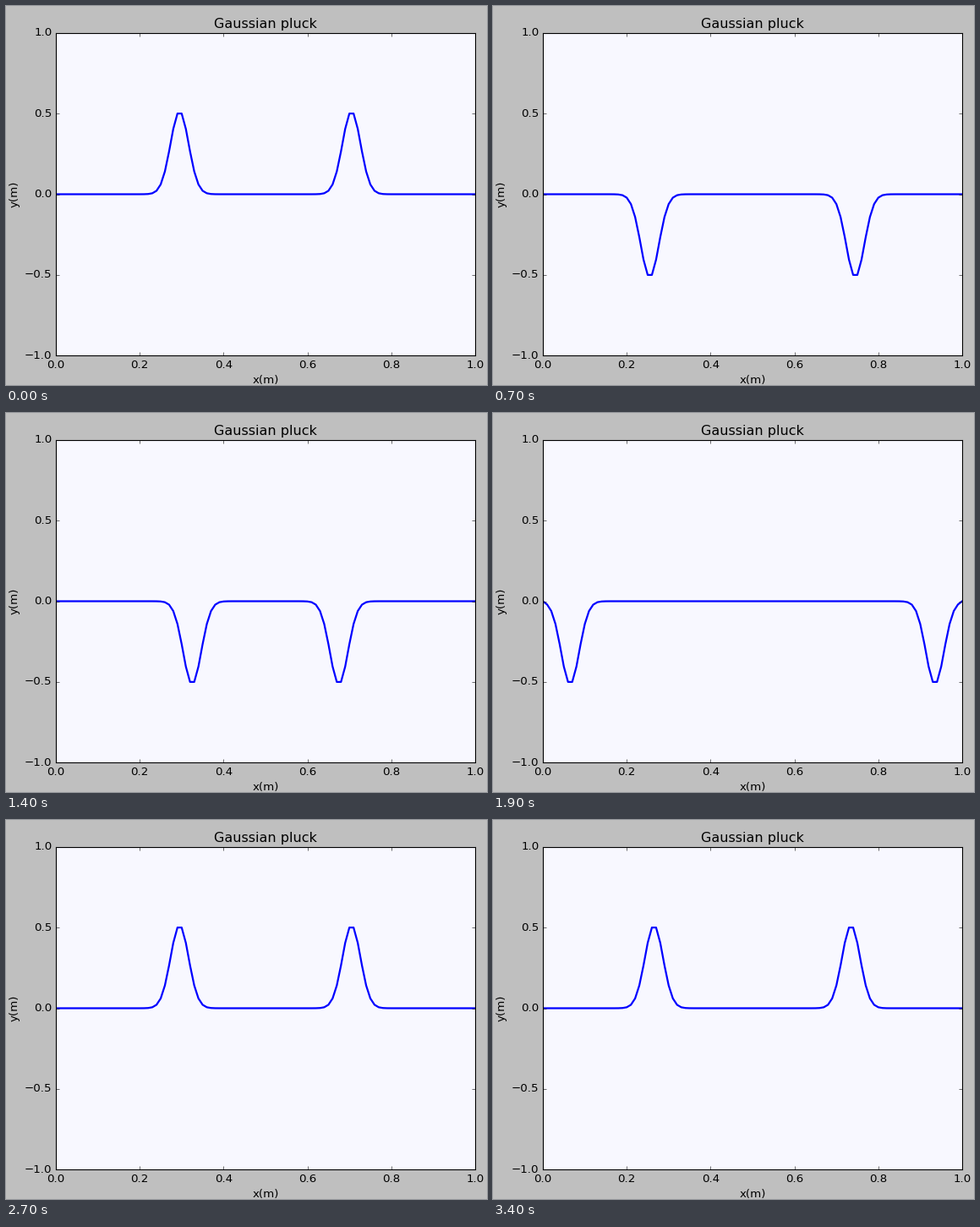
Recreate the animation shown at these times as a matplotlib script. Size 569 px wide and 448 px high, loop 3500 ms.

```python
import numpy as np
import matplotlib.pyplot as plt
from matplotlib.animation import FuncAnimation

W, H, DPI = 569, 448, 80
LEFT, RIGHT, TOP, BOTTOM = 59, 555, 31.7, 413.3

plt.rcParams.update({
    "font.family": "DejaVu Sans", "font.size": 12,
    "axes.linewidth": 1.0, "axes.axisbelow": False,
    "axes.titlesize": 14.4, "axes.titlepad": 5, "axes.labelpad": 5,
    "xtick.direction": "in", "ytick.direction": "in",
    "xtick.top": True, "ytick.right": True,
    "xtick.major.size": 4, "ytick.major.size": 4,
    "xtick.major.width": 0.5, "ytick.major.width": 0.5,
    "xtick.major.pad": 4, "ytick.major.pad": 4,
    "ytick.alignment": "center",
    "figure.facecolor": "0.75", "savefig.facecolor": "0.75",
})

# Time steps advanced per picture, as (step, repeats) runs
RUNS = [(7, 1), (8, 6), (6, 10), (4, 4), (6, 1), (4, 1), (6, 1),
        (4, 5), (6, 1), (4, 1), (8, 1), (10, 1), (8, 1)]
START = 21
steps = np.repeat(*np.transpose(RUNS))
times = START + np.concatenate([[0], np.cumsum(steps)])


def string_motion(x, count):
    """Leapfrog wave equation with fixed ends, starting at rest."""
    y = np.zeros((count, len(x)))
    y[0] = y[1] = np.exp(-1000 * (x - 0.5) ** 2)
    for n in range(1, count - 1):
        y[n + 1, 1:-1] = y[n, 2:] + y[n, :-2] - y[n - 1, 1:-1]
    return y


x = np.linspace(0, 1, 101)
waves = string_motion(x, times[-1] + 1)

fig = plt.figure(figsize=(W / DPI, H / DPI), dpi=DPI)
ax = fig.add_axes([LEFT / W, 1 - BOTTOM / H,
                   (RIGHT - LEFT) / W, (BOTTOM - TOP) / H],
                  facecolor="ghostwhite")
ax.set(xlim=(0, 1), ylim=(-1, 1), xlabel="x(m)", ylabel="y(m)",
       title="Gaussian pluck",
       xticks=np.linspace(0, 1, 6), yticks=np.linspace(-1, 1, 5))
line, = ax.plot(x, waves[START], color="#0000ff", lw=2)


def update(i):
    line.set_ydata(waves[times[i]])
    return line,


anim = FuncAnimation(fig, update, frames=len(times), interval=100,
                     repeat=True, repeat_delay=0)
plt.show()
```
